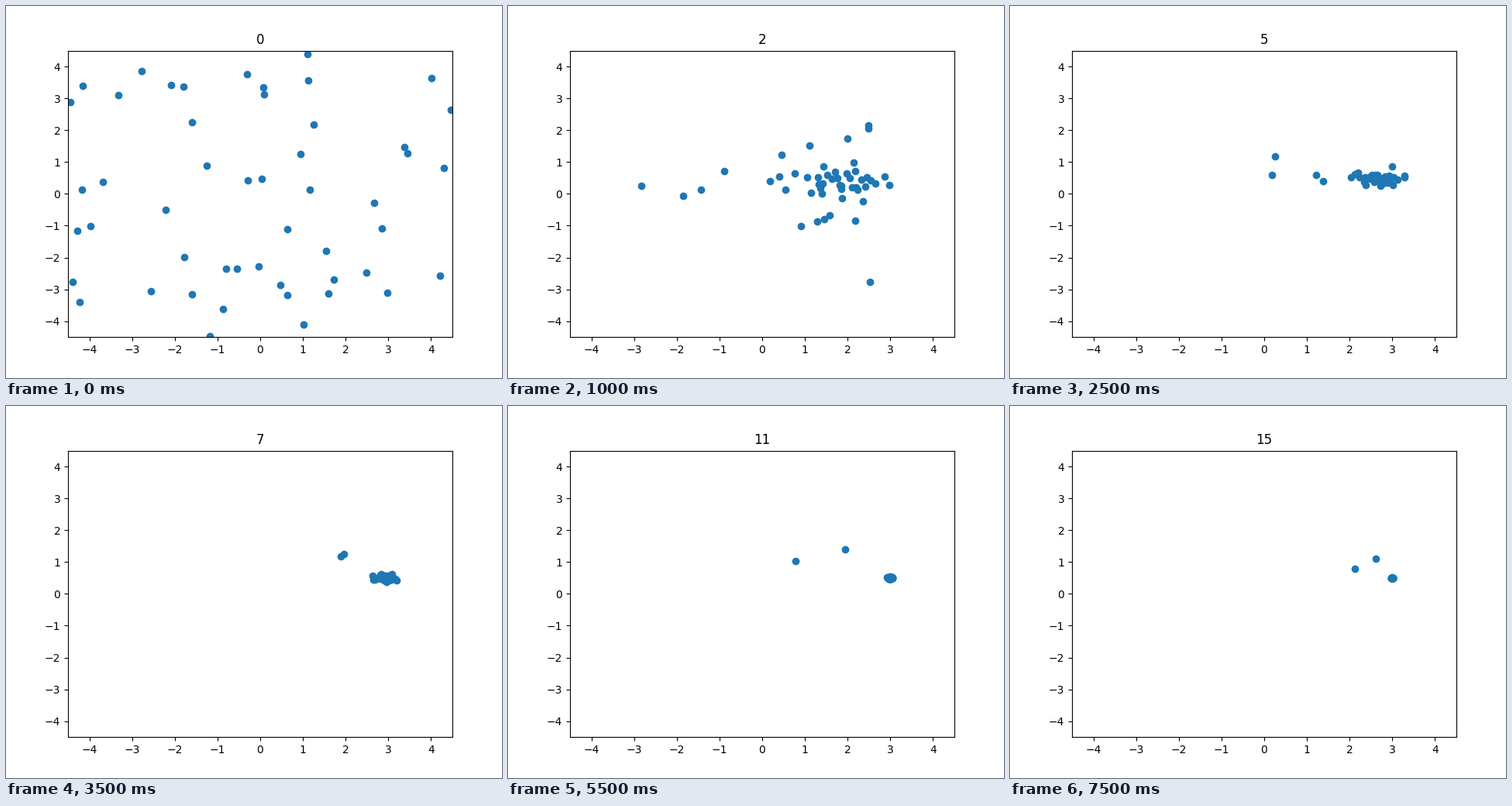
A matplotlib script for the animation above (8 s loop, 640x480 px).

```python
import numpy as np
import matplotlib.pyplot as plt
from matplotlib.animation import FuncAnimation

COUNT = 50
STEPS = 16
LIMIT = 4.5
FIRST_BEST = np.array([1.26, 0.42])
OPTIMUM = np.array([3.0, 0.5])
JITTER = np.array([0.5, 0.25])
SCOUTS_FROM = 5


def best(step):
    """Best known spot, closing in on the optimum."""
    return OPTIMUM + (FIRST_BEST - OPTIMUM) * 0.3 ** step


def scouts(step):
    """Two stragglers that swing past the swarm before returning."""
    swing = np.interp(step, [5, 7, 9, 11, 13, 15],
                      [0.18, 1.89, 2.05, 0.78, -0.21, 2.13])
    drift = np.interp(step, [5, 7, 11, 15], [0.25, 1.96, 1.95, 2.62])
    low = np.interp(step, [5, 7, 11, 15], [0.59, 1.18, 1.03, 0.78])
    high = np.interp(step, [5, 7, 11, 15], [1.17, 1.25, 1.40, 1.10])
    return [(swing, low), (drift, high)]


def simulate():
    """Each step pulls every particle a random part of the way to the best."""
    rng = np.random.default_rng(7)
    swarm = rng.uniform(-LIMIT, LIMIT, (COUNT, 2))
    history = [swarm]
    for step in range(1, STEPS):
        pull = rng.uniform(0, 1, swarm.shape)
        noise = rng.normal(size=swarm.shape) * JITTER * 0.75 ** step
        swarm = swarm + pull * (best(step - 1) - swarm)
        if step > 1:
            swarm = swarm + noise
        if step >= SCOUTS_FROM:
            swarm[:2] = scouts(step)
        history.append(swarm)
    return history


history = simulate()

fig, ax = plt.subplots(figsize=(6.4, 4.8), dpi=100)
ax.set_xlim(-LIMIT, LIMIT)
ax.set_ylim(-LIMIT, LIMIT)
ax.set_xticks(range(-4, 5))
ax.set_yticks(range(-4, 5))
dots, = ax.plot([], [], "o", color="C0")
title = ax.set_title("0")


def update(step):
    dots.set_data(*history[step].T)
    title.set_text(str(step))
    return dots, title


anim = FuncAnimation(fig, update, frames=STEPS, interval=500,
                     repeat=True, repeat_delay=0, blit=False)
plt.show()
```
